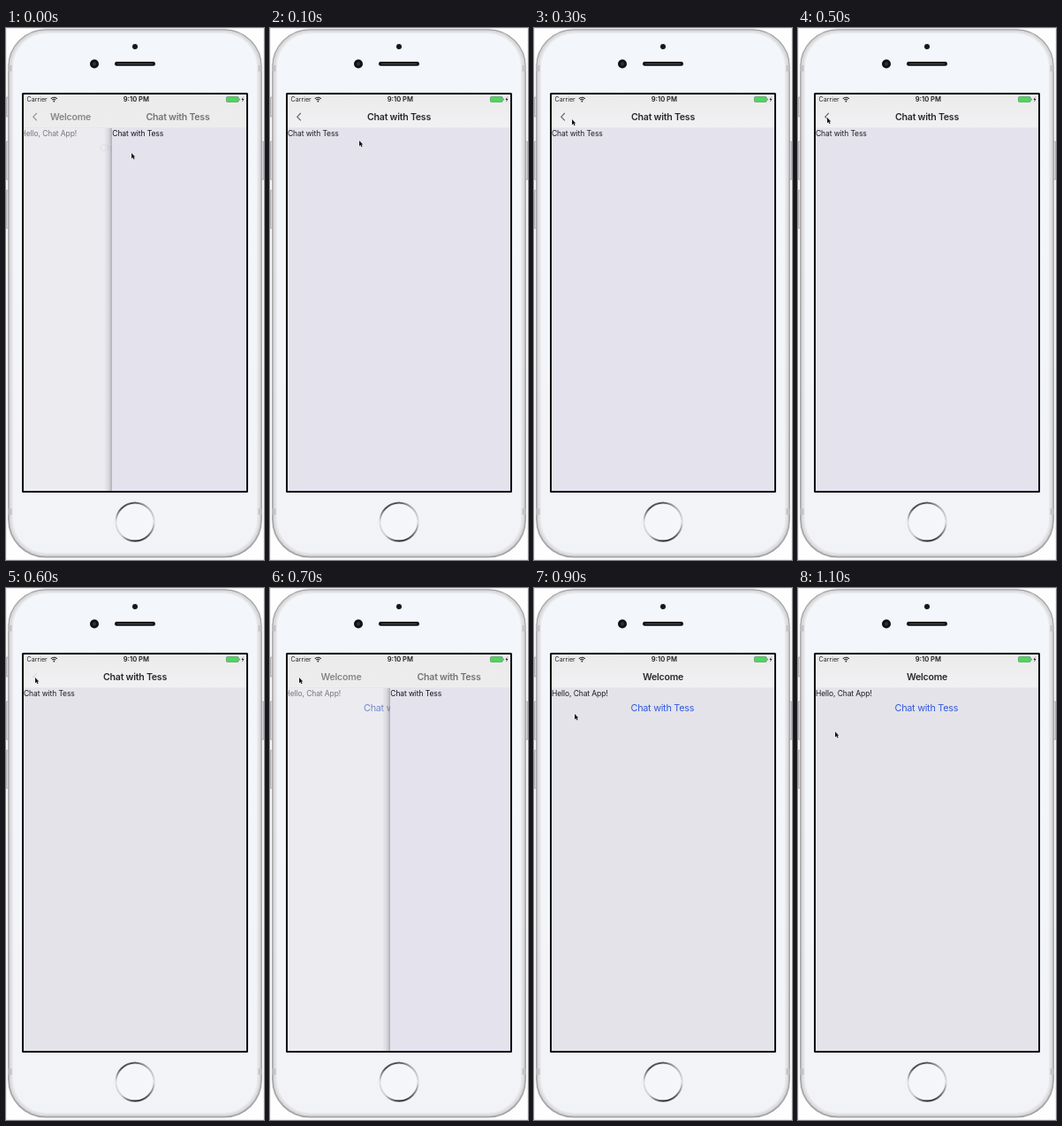
These frames come from a looping animation (292 by 600 pixels, 1200 ms). An HTML page with a canvas:

```html
<!DOCTYPE html>
<html lang="en">
<head>
<meta charset="utf-8">
<title>Chat navigation</title>
<style>
html, body { margin: 0; width: 100%; height: 100%; overflow: hidden; background: #fff; }
canvas { display: block; width: 292px; height: 600px; }
</style>
</head>
<body>
<canvas id="stage" width="292" height="600"></canvas>
<script>
const ctx = document.getElementById('stage').getContext('2d');
const STEP = 100, STEPS = 12;
const CHAT = 'Chat with Tess';
const LAVENDER = '#e4e2ed', GREY = '#e4e3e9', PALE = '#ecebf0';

// cursor tip at each step
const cursor = [
  [142, 141], [101, 127], [64, 111], [43, 103], [34, 101], [33, 101],
  [33, 101], [33, 101], [45, 118], [46, 142], [43, 158], [42, 162]
];

// push and pop positions of the sliding page
const slides = {
  0: { edge: 120, back: 73, title: 194.5, chevron: 0.65, link: 0.1 },
  7: { edge: 136, back: 80.5, title: 202.5, chevron: 0, link: 0.75 }
};

function box(x, y, w, h, fill) {
  ctx.fillStyle = fill;
  ctx.fillRect(x, y, w, h);
}

function round(x, y, w, h, r, fill, stroke, line = 1) {
  ctx.beginPath();
  ctx.roundRect(x, y, w, h, r);
  if (fill) { ctx.fillStyle = fill; ctx.fill(); }
  if (stroke) { ctx.strokeStyle = stroke; ctx.lineWidth = line; ctx.stroke(); }
}

function dot(x, y, r, fill) {
  ctx.beginPath();
  ctx.arc(x, y, r, 0, Math.PI * 2);
  ctx.fillStyle = fill;
  ctx.fill();
}

function path(points, color, line) {
  ctx.beginPath();
  points.forEach(([x, y]) => ctx.lineTo(x, y));
  if (line) { ctx.strokeStyle = color; ctx.lineWidth = line; ctx.stroke(); }
  else { ctx.closePath(); ctx.fillStyle = color; ctx.fill(); }
}

function vertical(y0, y1, top, bottom) {
  const g = ctx.createLinearGradient(0, y0, 0, y1);
  g.addColorStop(0, top);
  g.addColorStop(1, bottom);
  return g;
}

function label(text, x, y, size, color, { weight = 400, align = 'left', track = 0 } = {}) {
  ctx.font = `${weight} ${size}px Inter, "Liberation Sans", sans-serif`;
  ctx.letterSpacing = track + 'px';
  ctx.textAlign = align;
  ctx.fillStyle = color;
  ctx.fillText(text, x, y);
}

const heading = (text, x, color) =>
  label(text, x, 104, 10.6, color, { weight: 600, align: 'center', track: -0.25 });
const bodyText = (text, x, color) => label(text, x, 121.5, 8.5, color, { track: -0.1 });
const link = (x, color) => label(CHAT, x, 139.3, 10.8, color, { track: -0.25 });

function phone() {
  box(0, 0, 292, 600, '#fefefe');
  ctx.strokeStyle = '#ececec';
  ctx.lineWidth = 1;
  ctx.strokeRect(0.5, 0.5, 291, 599);
  for (const [x, y, h] of [[0.4, 78, 22], [0.4, 128, 43], [0.4, 183, 43], [288.5, 128, 43]])
    round(x, y, 3.1, h, 1, '#dcdcdf', '#9c9ca0', 0.8);

  // the metal rim lightens towards the glass
  round(2.8, 1.8, 286.4, 595, 42, vertical(0, 597, '#d2d2d5', '#b4b4b8'), '#a0a0a4', 1.2);
  for (let i = 1; i <= 4; i++) {
    const shade = 208 + i * 8;
    round(2.8 + i * 1.2, 1.8 + i, 286.4 - i * 2.4, 595 - i * 2.2, 42 - i, `rgb(${shade},${shade},${shade + 2})`);
  }
  round(8.4, 6.6, 275.2, 585, 37, vertical(6, 592, '#f3f7fb', '#f2f3f7'));
  for (const y of [42, 542])
    for (const x of [2.5, 285.5]) box(x, y, 4, 7, '#c2c2c6');

  dot(146, 21, 3, '#17171b');
  dot(100, 40.5, 5, '#111115');
  dot(100, 40.5, 2.2, '#2d2e3b');
  round(123, 38, 46, 4.8, 2.4, '#101012');
  box(126, 40, 40, 1, '#45454a');

  const ring = ctx.createConicGradient(-Math.PI / 2, 146, 557);
  ['#55555a', '#b5b5b9', '#dedee2', '#66666b', '#29292d', '#d0d0d4', '#e2e2e6', '#4c4c51', '#55555a']
    .forEach((c, i) => ring.addColorStop(i / 8, c));
  dot(146, 557, 21.6, '#f5f6fa');
  ctx.beginPath();
  ctx.arc(146, 557, 21.6, 0, Math.PI * 2);
  ctx.strokeStyle = ring;
  ctx.lineWidth = 2;
  ctx.stroke();
  round(18, 73, 256, 451, 1.5, '#060608');
}

function statusBar() {
  label('Carrier', 23.5, 83.3, 7.1, '#1f1f21');
  ctx.strokeStyle = '#222';
  ctx.lineWidth = 1.1;
  for (const r of [2.6, 4.7]) {
    ctx.beginPath();
    ctx.arc(54.3, 83, r, -Math.PI * 0.76, -Math.PI * 0.24);
    ctx.stroke();
  }
  dot(54.3, 82.6, 0.9, '#222');
  label('9:10 PM', 147.3, 83.3, 7.6, '#1c1c1e', { weight: 600, align: 'center' });
  round(249.4, 77.6, 13.8, 5.8, 1.2, '#4fd562', '#55895d', 0.6);
  box(263.8, 79.4, 1, 2.2, '#739079');
  path([[268.6, 77.4], [266.5, 81], [267.9, 81], [267.2, 83.8], [269.4, 80], [268, 80]], '#222');
}

function navBar(sliding) {
  box(20, 75, 252, 38, vertical(75, 113, '#ebebec', sliding ? '#ededee' : '#f1f0f2'));
  box(20, 112.5, 252, 0.5, '#dfdee4');
  statusBar();
}

function chevron(alpha) {
  if (!alpha) return;
  ctx.globalAlpha = alpha;
  path([[34.8, 96], [30.8, 100.2], [34.8, 104.4]], '#68686b', 1.2);
  ctx.globalAlpha = 1;
}

function welcomePage() {
  box(20, 113, 252, 410, GREY);
  navBar(false);
  heading('Welcome', 146, '#29292c');
  bodyText('Hello, Chat App!', 20, '#1c1c1f');
  link(109.5, '#3159df');
}

function chatPage(pressed) {
  box(20, 113, 252, 410, pressed ? GREY : LAVENDER);
  navBar(false);
  chevron(pressed ? 0.15 : 1);
  heading(CHAT, 146, '#29292c');
  bodyText(CHAT, 20, '#1c1c1f');
}

function slidePage(s) {
  box(20, 113, 252, 410, PALE);
  bodyText('Hello, Chat App!', 16.5, '#77777b');
  ctx.globalAlpha = s.link;
  link(106, '#4c68bd');
  ctx.globalAlpha = 1;
  const shade = ctx.createLinearGradient(s.edge - 9, 0, s.edge, 0);
  shade.addColorStop(0, 'rgba(90,90,100,0)');
  shade.addColorStop(0.6, 'rgba(90,90,100,.14)');
  shade.addColorStop(1, 'rgba(90,90,100,.42)');
  box(s.edge - 9, 113, 9, 410, shade);
  box(s.edge, 113, 272 - s.edge, 410, LAVENDER);
  bodyText(CHAT, s.edge + 0.3, '#111114');
  navBar(true);
  chevron(s.chevron);
  heading('Welcome', s.back, '#88888b');
  heading(CHAT, s.title, '#747477');
}

function pointer([x, y]) {
  const shape = [[0, 0], [0, 6.2], [1.5, 5], [2.6, 7.2], [3.6, 6.7], [2.6, 4.6], [4.4, 4.4]]
    .map(([dx, dy]) => [x + dx, y + dy]);
  path([...shape, shape[0]], 'rgba(255,255,255,.8)', 1);
  path(shape, '#151518');
}

function draw(step) {
  phone();
  ctx.save();
  ctx.beginPath();
  ctx.rect(20, 75, 252, 447);
  ctx.clip();
  if (slides[step]) slidePage(slides[step]);
  else if (step < 7) chatPage(step === 6);
  else welcomePage();
  pointer(cursor[step]);
  ctx.restore();
}

const start = performance.now();
function tick() {
  draw(Math.floor((performance.now() - start) / STEP) % STEPS);
  requestAnimationFrame(tick);
}
tick();
</script>
</body>
</html>
```
